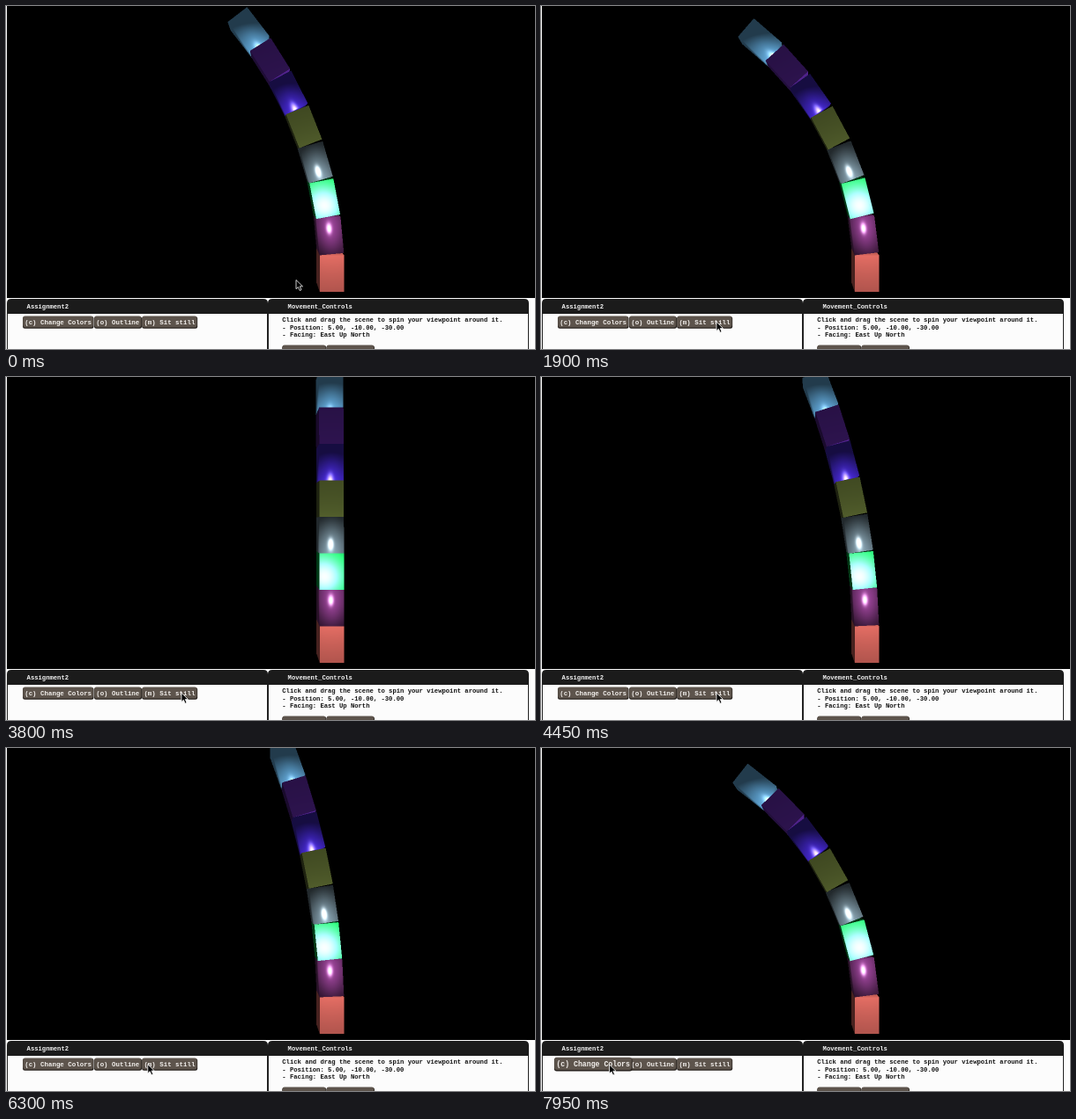
Write an HTML page with a canvas that moves like this. It is 600 px wide and 390 px high and loops after 8000 ms.

```html
<!DOCTYPE html>
<html lang="en">
<head>
<meta charset="utf-8">
<title>Swaying boxes</title>
<style>
html, body { margin: 0; width: 100%; height: 100%; overflow: hidden; background: #fcfcfc; }
canvas { position: absolute; left: 180px; top: 0; width: 220px; height: 332px; }
#scene { position: absolute; left: 1px; top: 0; width: 599px; height: 331.5px; background: #000; }
svg { position: absolute; left: 0; top: 0; }
text { font: bold 7.2px "Liberation Mono", monospace; fill: #111; white-space: pre; }
.light { fill: #f4f4f4; }
.key text { font-size: 7.45px; fill: #f2efec; }
.focus rect { stroke: #0c0a09; stroke-width: 1; }
</style>
</head>
<body>
<div id="scene"></div>
<canvas id="view" width="440" height="664"></canvas>
<svg width="600" height="390" viewBox="0 0 600 390">
  <g id="panels"></g>
  <g id="keys"></g>
  <path id="cursor" d="M0 0V10.2L2.4 8L4.2 12L6 11.2L4.3 7.3H7.5Z" fill="#000" stroke="#fff" stroke-width=".8"/>
</svg>
<script>
const LOOP = 8000, STEP = 50, PERIOD = 3000, LOW = 867;
const MAX_ANGLE = Math.PI / 20;
const STILL = [2350, 3600];

// Camera and light, in world units
const FOCAL = 166 / Math.tan(Math.PI / 8), CX = 300.5, CY = 166;
const EYE = [-5, 10, 30], LIGHT = [0, 5, 5];
const LEFT = 180, SS = 2;
const AMBIENT = 0.3, DIFFUSE = 0.9, SHINE = 40;
const COLORS = [
  [238, 114, 104], [130, 57, 128], [0, 190, 75], [114, 137, 149],
  [100, 115, 53], [72, 42, 218], [82, 35, 142], [114, 196, 252]
];

const $ = id => document.getElementById(id);
const canvas = $('view'), ctx = canvas.getContext('2d');
const W = canvas.width, H = canvas.height;
const image = ctx.createImageData(W, H);
const depth = new Float32Array(W * H);

function swayAngle(t) {
  if (t >= STILL[0] && t < STILL[1]) return MAX_ANGLE;
  return MAX_ANGLE * (0.5 - 0.5 * Math.cos((t - LOW) / PERIOD * 2 * Math.PI));
}

// Phong shading of one surface point
function shade(px, x, y, z, nx, ny, nz, color) {
  let lx = LIGHT[0] - x, ly = LIGHT[1] - y, lz = LIGHT[2] - z;
  const dist = Math.hypot(lx, ly, lz);
  lx /= dist; ly /= dist; lz /= dist;
  const vx = EYE[0] - x, vy = EYE[1] - y, vz = EYE[2] - z;
  const far = Math.hypot(vx, vy, vz);
  const hx = lx + vx / far, hy = ly + vy / far, hz = lz + vz / far;
  const nl = Math.hypot(nx, ny, nz);
  const cosL = Math.max(0, nx * lx + ny * ly + nz * lz) / nl;
  const cosH = Math.max(0, nx * hx + ny * hy + nz * hz) / nl / Math.hypot(hx, hy, hz);
  const fade = 1 / (1 + dist * dist / 1000);
  const base = AMBIENT + DIFFUSE * cosL * fade;
  const gloss = 255 * fade * Math.pow(cosH, SHINE);
  for (let k = 0; k < 3; k++) image.data[px * 4 + k] = color[k] * base + gloss;
  image.data[px * 4 + 3] = 255;
}

// Ray-cast one 2 x 3 x 2 box turned by angle a about the z axis
function drawBox(mx, my, a, color, smooth) {
  const c = Math.cos(a), s = Math.sin(a);
  const ex = EYE[0] - mx, ey = EYE[1] - my;
  const o = [c * ex + s * ey, (c * ey - s * ex) / 1.5, EYE[2]];
  const sx = (CX - FOCAL * ex / 30 - LEFT) * SS, sy = (CY + FOCAL * ey / 30) * SS;
  const r = 29 * SS;
  const x0 = Math.max(0, Math.floor(sx - r)), x1 = Math.min(W, sx + r);
  const y0 = Math.max(0, Math.floor(sy - r)), y1 = Math.min(H, sy + r);
  const d = [0, 0, -1];
  for (let j = y0; j < y1; j++) {
    const dy = (CY - (j + 0.5) / SS) / FOCAL;
    for (let i = x0; i < x1; i++) {
      const dx = (LEFT + (i + 0.5) / SS - CX) / FOCAL;
      d[0] = c * dx + s * dy;
      d[1] = (c * dy - s * dx) / 1.5;
      let near = -1e9, far = 1e9, axis = 0;
      for (let k = 0; k < 3; k++) {
        const mid = -o[k] / d[k], half = Math.abs(1 / d[k]);
        if (mid - half > near) { near = mid - half; axis = k; }
        far = Math.min(far, mid + half);
      }
      const px = j * W + i;
      if (near > far || near >= depth[px]) continue;
      depth[px] = near;
      let u = 0, v = 0, w = 0;
      if (smooth) {
        u = o[0] + d[0] * near;
        v = (o[1] + d[1] * near) / 1.5;
        w = o[2] - near;
      } else {
        const side = -Math.sign(d[axis]);
        if (axis === 0) u = side; else if (axis === 1) v = side; else w = side;
      }
      shade(px, EYE[0] + dx * near, EYE[1] + dy * near, EYE[2] - near,
        c * u - s * v, s * u + c * v, w, color);
    }
  }
}

function drawTower(angle) {
  image.data.fill(0);
  depth.fill(1e9);
  let x = -1, y = -1.5;
  COLORS.forEach((color, i) => {
    const a = i * angle, c = Math.cos(a), s = Math.sin(a);
    drawBox(x + c - 1.5 * s, y + s + 1.5 * c, a, color, i % 2 === 1);
    x -= 3 * s;
    y += 3 * c;
  });
  ctx.putImageData(image, 0, 0);
}

const label = (x, y, s, cls = '') => `<text x="${x}" y="${y}" class="${cls}">${s}</text>`;

function panel(x, title) {
  return `<path d="M${x + .5} 390V346M${x + 295.5} 390V346" stroke="#222" fill="none"/>
    <path d="M${x} 350V338Q${x} 333 ${x + 5} 333H${x + 291}Q${x + 296} 333 ${x + 296} 338V350Z" fill="#1b1b1b"/>`
    + label(x + 22.6, 344.3, title, 'light');
}

function key(x, y, w, s, id = '') {
  return `<g class="key" id="${id}">
    <rect x="${x}" y="${y + .6}" width="${w}" height="13.8" rx="2.5" fill="#28231f"/>
    <rect x="${x + .2}" y="${y}" width="${w - .9}" height="13" rx="2.3" fill="#5d544c"/>
    ${label(x + 2.2, y + 9.6, s)}</g>`;
}

$('panels').innerHTML = panel(1, 'Assignment2') + panel(297, 'Movement_Controls')
  + label(313.3, 359.3, 'Click and drag the scene to spin your viewpoint around it.')
  + label(313.3, 367.6, '- Position: 5.00, -10.00, -30.00')
  + label(313.3, 375.9, '- Facing: East Up North')
  + key(313.3, 385.5, 50, '') + key(363.5, 385.5, 54.5, '');
$('keys').innerHTML = key(154.2, 352.4, 63, '(m) Sit still') + key(100, 352.4, 54, '(o) Outline', 'outline')
  + key(19, 352.4, 80.5, '(c) Change Colors', 'colors');

const PATH = [
  [0, 329, 311.5], [100, 329, 311.5], [900, 203, 356], [1300, 203, 356], [1800, 199, 359.2],
  [5900, 199, 359.2], [6600, 136, 360], [7250, 136, 360], [7700, 77.5, 360], [LOOP, 77.5, 360]
];

function ease(t, a, b) {
  const k = Math.min(1, Math.max(0, (t - a) / (b - a)));
  return k * k * (3 - 2 * k);
}

function cursorAt(t) {
  const n = PATH.findIndex(p => p[0] > t);
  const a = PATH[n - 1], b = PATH[n], k = ease(t, a[0], b[0]);
  return [a[1] + (b[1] - a[1]) * k, a[2] + (b[2] - a[2]) * k];
}

function render(t) {
  drawTower(swayAngle(t));
  const [x, y] = cursorAt(t);
  $('cursor').setAttribute('transform', `translate(${x} ${y})`);
  $('outline').classList.toggle('focus', y > 352 && x > 100 && x < 154);
  const grow = 1 + 0.1 * ease(t, 7500, 7750);
  $('colors').setAttribute('transform', `translate(59.2 359.4) scale(${grow}) translate(-59.2 -359.4)`);
}

const start = performance.now();
let shown = -1;
function tick() {
  let t = Math.floor((performance.now() - start) % LOOP / STEP) * STEP;
  if (t < 2 * STEP) t = STEP / 2; // the first pose is held
  if (t !== shown) render(shown = t);
  requestAnimationFrame(tick);
}
tick();
</script>
</body>
</html>
```
